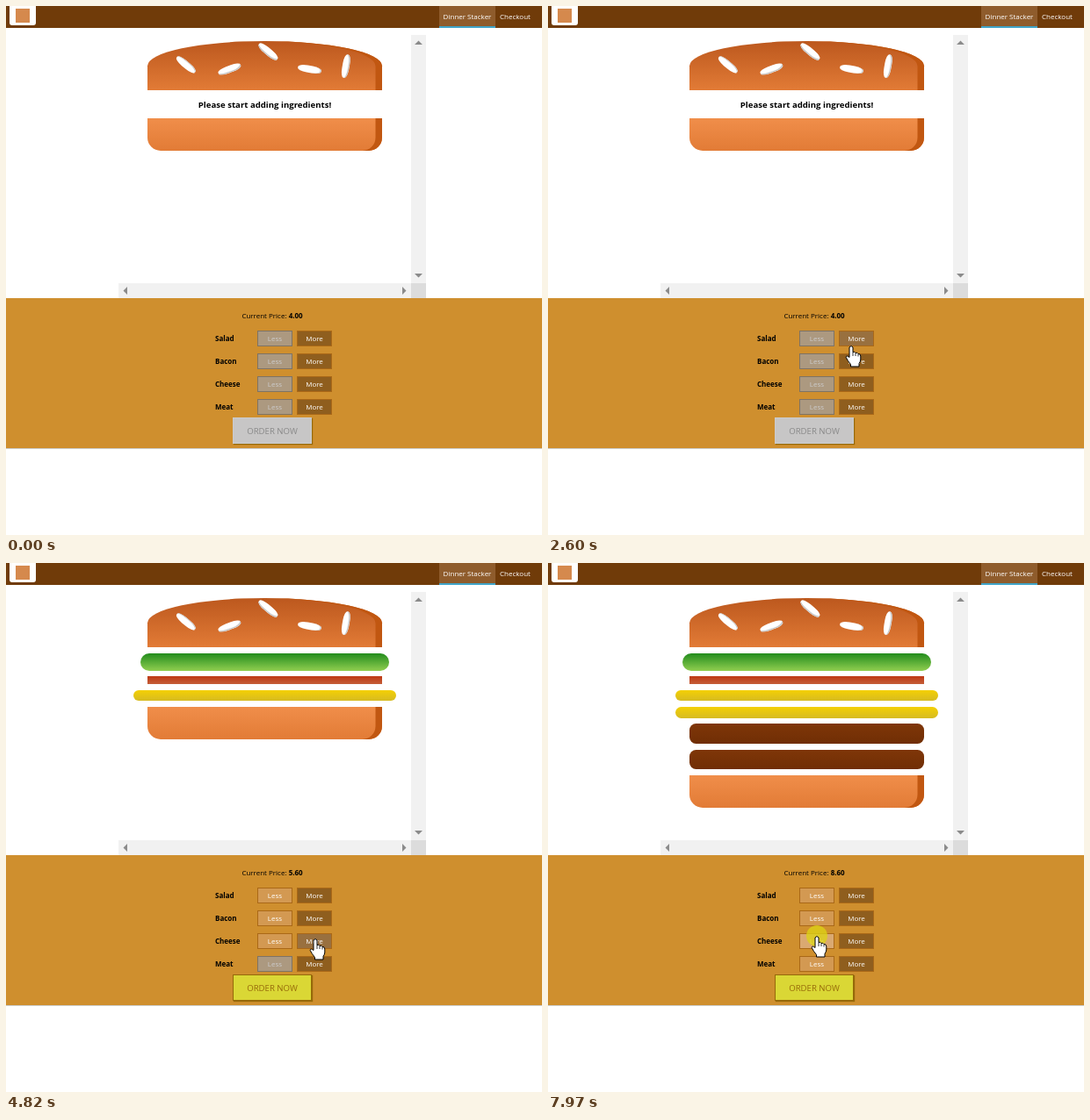
Recreate the animation shown at these times as an HTML page. Size 610 px wide and 603 px high, loop 8 s.

```html
<!DOCTYPE html>
<html lang="en">
<head>
<meta charset="utf-8">
<title>Sandwich order form</title>
<style>
* { box-sizing: border-box; }
html, body { margin: 0; width: 100%; height: 100%; overflow: hidden; background: #fff; }
body { position: relative; font: 8px "Open Sans", sans-serif; }
.abs, .btn, .link, .label, #bar, #controls, #order, #price, #status, svg { position: absolute; }
.btn, .link, .label, #order, #price { display: flex; align-items: center; white-space: pre; }
.btn, .link, #order, #price { justify-content: center; }

#bar { left: 0; top: 0; width: 100%; height: 25px; background: #703b09; }
.link { top: 0; height: 25px; padding-bottom: 2px; color: #fff; }
.active { background: #8f5c2c; border-bottom: 2px solid #40a4c8; padding: 0; }
.badge { left: 4px; top: 0; width: 30px; height: 22px; background: #fff; border-radius: 0 0 3px 3px; }
.mark { left: 11px; top: 3px; width: 16px; height: 16px; background: #d5894d; }

#burger { position: absolute; left: 128px; top: 33px; width: 333px; height: 283px; overflow: hidden; text-align: center; }
#burger > div { margin: 2% auto; }
#burger p { margin: 9.4px 0; font: bold 9.6px/13px "Open Sans", sans-serif; }
.top { height: 20%; width: 80%; position: relative; border-radius: 50% 50% 0 0;
  background: linear-gradient(#bc581e, #e27b36); box-shadow: inset -7.5px 0 #c15711; }
.bottom { height: 13%; width: 80%; border-radius: 0 0 15px 15px;
  background: linear-gradient(#f08e4a, #e27b36); box-shadow: inset -7.5px 0 #c15711; }
.salad { height: 7%; width: 85%; border-radius: 10px; background: linear-gradient(#228c1d, #91ce50); }
.bacon { height: 3%; width: 80%; background: linear-gradient(#bf3813, #c45e38); }
.cheese { height: 4.5%; width: 90%; border-radius: 10px; background: linear-gradient(#f4d004, #d6bb22); }
.meat { height: 8%; width: 80%; border-radius: 7.5px; background: linear-gradient(#7f3608, #702e05); }
.seed, .seed::before, .seed::after { position: absolute; width: 10%; height: 15%; background: #fff; border-radius: 40%; }
.seed::before, .seed::after { content: ""; width: 100%; height: 100%; }
.s1 { left: 30%; top: 50%; transform: rotate(-20deg); box-shadow: inset -1px -1.5px #c9c9c9; }
.s1::after { left: -170%; top: -260%; transform: rotate(60deg); box-shadow: inset -.5px 1px #c9c9c9; }
.s1::before { left: 180%; top: -50%; transform: rotate(60deg); box-shadow: inset -.5px -1.5px #c9c9c9; }
.s2 { left: 64%; top: 50%; transform: rotate(10deg); box-shadow: inset -1.5px 0 #c9c9c9; }
.s2::before { left: 150%; top: -130%; transform: rotate(90deg); box-shadow: inset .5px 1.5px #c9c9c9; }
.s2::after { display: none; }

#controls { left: 0; top: 333px; width: 100%; height: 171px; background: #cf8f2e; box-shadow: 0 1px .5px #ccc; }
#price { left: 203px; top: 344px; width: 200px; height: 16px; }
.label { left: 238px; height: 18px; font-weight: bold; }
.btn { width: 40px; height: 18px; border: 1px solid #aa6817; color: #fff; }
.less { left: 286px; background: #d39952; }
.more { left: 331px; background: #8f5e1e; }
.less.hover { background: #daa972; }
.more.hover { background: #99703f; }
.less.off { background: #ac9980; border-color: #7e7365; color: #ccc; }
#order { left: 258px; top: 469px; width: 90px; height: 30px; font-size: 9.6px;
  border: 1px solid #966909; background: #dad735; color: #966909; box-shadow: 1px 1px 1px #966909; }
#order.off { background: #c7c6c6; border-color: #ccc; color: #888; }

#status { left: 0; top: 583px; width: 82px; height: 20px; background: #e7e8eb; border-radius: 0 4px 0 0;
  color: #5f6368; font-size: 11.2px; line-height: 21px; text-indent: -1px; white-space: nowrap; }
svg { left: 0; top: 0; }
</style>
</head>
<body>
<div id="bar">
  <div class="abs badge"></div><div class="abs mark"></div>
  <div class="link active" style="left:493px;width:64px">Dinner Stacker</div>
  <div class="link" style="left:557px;width:45px">Checkout</div>
</div>
<div id="burger"></div>
<div id="controls"></div>
<div id="price"></div>
<div id="order">ORDER NOW</div>
<div id="status">localhost:3000</div>
<svg width="610" height="603">
  <path fill="#f1f1f1" d="M461 33h17v283h-17zM128 316h333v17H128z"/>
  <path fill="#dcdcdc" d="M461 316h17v17h-17z"/>
  <path fill="#8b8b8b" d="M465 44l4.500-4.500 4.500 4.500zM465 305l4.500 4.500 4.500-4.500zM138 320l-4.500 4.500 4.500 4.500zM451 320l4.500 4.500-4.500 4.500z"/>
  <g id="cursor" stroke="#000" stroke-linejoin="round">
    <circle id="press" r="12" fill="#dcd214" fill-opacity=".78" stroke="none"/>
    <path id="arrow" fill="#fff" d="M.5 .5V16.500L4.200 13 6.700 19 9 18 6.500 12.200H11.500Z"/>
    <g id="hand" fill="#fff">
      <path d="M-2 2Q0-1 2 2V7.500Q4 6.500 5 8.500 7 7.500 8 9.500 10.500 9 10.800 12V16Q10.500 18.500 9 20.500V24H-.5V21.500Q-4 17.500-5.800 13.500-5.500 10.500-2 13.500Z"/>
      <path fill="none" stroke-width=".8" d="M2 7.500V12M5 8.500V12M8 9.500V12.500"/>
    </g>
  </g>
</svg>
<script>
const LOOP = 8000, STEP = 76;
const $ = id => document.getElementById(id);
const names = ['salad', 'bacon', 'cheese', 'meat'];
const cost = { salad: .5, bacon: .7, cheese: .4, meat: 1.3 };
const added = [[3050, 'salad'], [4130, 'bacon'], [4820, 'cheese'], [5220, 'cheese'], [5990, 'meat'], [6210, 'meat']];
const presses = [[2970, 3050], [4750, 4820], [5140, 5220], [5830, 5990], [6140, 6210], [7970, 8000]];

// first step, last step, end position
const moves = [
  [500, 500, 552, 238], [576, 1260, 506, 10], [1660, 1890, 253, 285], [1966, 2440, 345, 389],
  [2510, 2820, 346, 383], [3360, 3580, 347, 401], [4300, 4360, 348, 426], [4530, 4530, 352, 428],
  [5370, 5530, 350, 458], [6460, 6690, 382, 475], [6766, 7250, 306, 416],
  [7330, 7410, 306, 409], [7570, 7720, 306, 425]
];

function add(cls, text, top) {
  const el = document.createElement('div');
  el.className = cls;
  el.textContent = text;
  el.style.top = top + 'px';
  $('order').before(el);
  return el;
}

const rows = names.map((name, i) => {
  const y = 369.5 + 26 * i;
  add('label', name[0].toUpperCase() + name.slice(1), y);
  return { name, y, less: add('btn less', 'Less', y), more: add('btn more', 'More', y) };
});

function cursorAt(t) {
  let x = 552, y = 238;
  for (const [from, to, ex, ey] of moves) {
    if (t < from) break;
    const steps = Math.round((to - from) / STEP) + 1;
    const p = Math.min(1, Math.floor((t - from) / STEP + 1) / steps);
    x += (ex - x) * p;
    y += (ey - y) * p;
  }
  return [x, y];
}

const inside = (x, y, left, top, w, h) => x >= left && x < left + w && y >= top && y < top + h;
const show = (el, on) => el.style.display = on ? '' : 'none';

let shown = -1;
function stack(items) {
  if (shown === items.length) return;
  shown = items.length;
  const layers = items.map(n => `<div class="${n}"></div>`).join('');
  $('burger').innerHTML = '<div class="top"><div class="seed s1"></div><div class="seed s2"></div></div>' +
    (layers || '<p>Please start adding ingredients!</p>') + '<div class="bottom"></div>';
  const total = items.reduce((sum, n) => sum + cost[n], 4);
  $('price').innerHTML = `Current Price: <b>${total.toFixed(2)}</b>`;
}

function draw(t) {
  const items = added.filter(a => t >= a[0]).map(a => a[1]).sort((a, b) => names.indexOf(a) - names.indexOf(b));
  stack(items);

  const [x, y] = cursorAt(t);
  let pointing = inside(x, y, 493, 0, 64, 25);
  for (const { name, y: top, less, more } of rows) {
    const off = !items.includes(name);
    const overLess = !off && inside(x, y, 286, top, 40, 18);
    const overMore = inside(x, y, 331, top, 40, 18);
    less.classList.toggle('off', off);
    less.classList.toggle('hover', overLess);
    more.classList.toggle('hover', overMore);
    pointing = pointing || overLess || overMore;
  }

  // one pulse when ordering becomes possible
  const p = Math.min(1, Math.max(0, (t - 2995) / 300));
  const pulse = items.length ? .1 * Math.min(p / .6, (1 - p) / .4) : 0;
  $('order').classList.toggle('off', !items.length);
  $('order').style.transform = pulse ? `scale(${1 + pulse})` : 'none';

  $('status').style.opacity = t < 1340 || t >= 2150 ? 0 : Math.min(1, Math.floor((t - 1340) / 75 + 1) / 3);

  show($('cursor'), t >= 500);
  show($('hand'), pointing);
  show($('arrow'), !pointing);
  show($('press'), presses.some(([a, b]) => t >= a && t < b));
  $('cursor').setAttribute('transform', `translate(${Math.round(x)} ${Math.round(y)})`);
}

const start = performance.now();
function tick() {
  draw((performance.now() - start) % LOOP);
  requestAnimationFrame(tick);
}
tick();
</script>
</body>
</html>
```
